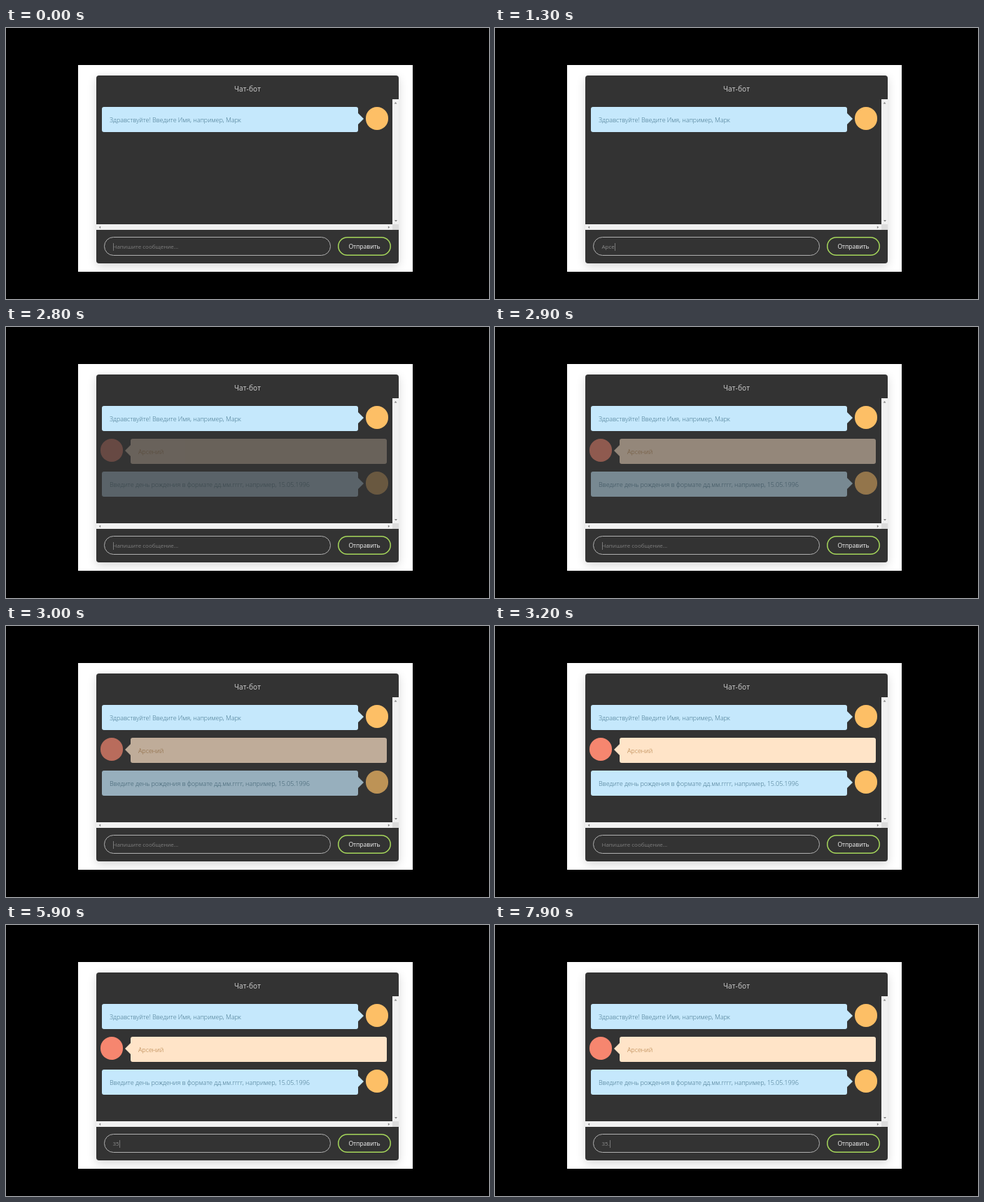
An HTML page for the animation above (8 s loop, 690 by 388 pixels).

```html
<!DOCTYPE html>
<html lang="ru">
<head>
<meta charset="utf-8">
<title>Чат-бот</title>
<style>
  html, body { margin: 0; width: 100%; height: 100%; overflow: hidden; background: #000; }
  body { font-family: "Open Sans", "Noto Sans", sans-serif; font-weight: 300; }
  .stage { position: absolute; left: 0; top: 0; width: 690px; height: 388px; overflow: hidden; background: #000; }
  .stage * { position: absolute; box-sizing: border-box; white-space: pre; }

  .page { left: 103px; top: 53px; width: 478px; height: 296px; background: #fff; overflow: hidden; }
  .panel { left: 26px; top: 15px; width: 432px; height: 269px; border-radius: 4px;
           background: #333; box-shadow: 0 4px 14px rgba(0, 0, 0, .16); }
  .title { left: 0; top: 0; width: 432px; line-height: 38px; text-align: center;
           font-size: 10.1px; font-weight: 400; letter-spacing: .15px; color: #d2d2d2; }

  .bar { background: #f1f1f1; }
  .bar.v { left: 423px; top: 34px; width: 9px; height: 179px; }
  .bar.h { left: 0; top: 213px; width: 423px; height: 8px; }
  .corner { left: 423px; top: 213px; width: 9px; height: 8px; background: #dcdcdc; }
  .arrow { width: 4px; height: 2.5px; background: #858585; clip-path: polygon(50% 0, 100% 100%, 0 100%); }

  .msg { left: 0; width: 423px; height: 36px; }
  .bubble { top: 0; width: 366px; height: 36px; padding-left: 11px; border-radius: 3px;
            line-height: 37.5px; font-size: 9.05px; letter-spacing: -.06px; }
  .bubble::after { content: ""; position: absolute; top: 8.5px; width: 8.5px; height: 17px; background: inherit; }
  .face { top: 0; width: 32.6px; height: 32.6px; border-radius: 50%; }
  .bot .bubble { left: 8px; background: #c5e8fc; color: #3f7088; }
  .bot .bubble::after { right: -8px; clip-path: polygon(0 0, 100% 50%, 0 100%); }
  .bot .face { left: 384.7px; background: #fdbf66; }
  .user .bubble { left: 49px; background: #ffe4c8; color: #b07a3e; }
  .user .bubble::after { left: -8px; clip-path: polygon(100% 0, 0 50%, 100% 100%); }
  .user .face { left: 5.7px; background: #f6866f; }

  .field, .send { top: 231px; height: 27px; border-radius: 14px; font-weight: 400; }
  .field { left: 11px; width: 324px; border: 1px solid #b0b0b0; padding-left: 11.5px;
           line-height: 26px; font-size: 8px; color: #8c8c8c; }
  .field * { position: static; }
  .hint { color: #7e7e7e; }
  .caret { display: inline-block; width: 1px; height: 11px; margin-right: -1px;
           vertical-align: -2.5px; background: #777; }
  .send { left: 345px; width: 76px; box-shadow: inset 0 0 0 1.5px #a6d75b; text-align: center;
          line-height: 28px; font-size: 8.7px; letter-spacing: -.1px; color: #f4f4f4; }
</style>
</head>
<body>
<div class="stage">
  <div class="page">
    <div class="panel">
      <div class="title">Чат-бот</div>
      <div class="bar v"></div>
      <div class="bar h"></div>
      <div class="corner"></div>
      <div class="arrow" style="left:425.5px;top:38px"></div>
      <div class="arrow" style="left:425.5px;top:207px;transform:rotate(180deg)"></div>
      <div class="arrow" style="left:3px;top:216px;transform:rotate(-90deg)"></div>
      <div class="arrow" style="left:416px;top:216px;transform:rotate(90deg)"></div>

      <div class="msg bot" style="top:45px"><div class="bubble">Здравствуйте! Введите Имя, например, Марк</div><div class="face"></div></div>
      <div class="msg user reply" style="top:92px"><div class="bubble">Арсений</div><div class="face"></div></div>
      <div class="msg bot reply" style="top:139px"><div class="bubble">Введите день рождения в формате дд.мм.гггг, например, 15.05.1996</div><div class="face"></div></div>

      <div class="field"><span class="typed"></span><span class="caret"></span><span class="hint">Напишите сообщение...</span></div>
      <div class="send">Отправить</div>
    </div>
  </div>
</div>
<script>
  const LOOP = 8000, FADE_FROM = 2675, FADE_TO = 3150;
  // [start ms, typed text, caret shown]
  const steps = [
    [0, "", 1], [300, "", 0], [500, "А", 1], [700, "Ар", 1], [900, "Арс", 1],
    [1100, "Арсе", 1], [1500, "Арсе", 0], [1900, "Арсен", 1], [2050, "Арсени", 1],
    [2200, "Арсений", 1], [2700, "", 1], [3200, "", 0], [3700, "", 1], [4300, "", 0],
    [4800, "", 1], [5300, "", 0], [5600, "3", 1], [5900, "35", 1], [6400, "35", 0],
    [6900, "35", 1], [7500, "35", 0], [7600, "35.", 1]
  ];
  const find = s => document.querySelector(s);
  const typed = find(".typed"), caret = find(".caret"), hint = find(".hint");
  const replies = document.querySelectorAll(".reply");
  const start = performance.now();

  function draw() {
    const t = (performance.now() - start) % LOOP;
    const [, text, on] = steps.filter(s => s[0] <= t).pop();
    if (typed.textContent !== text) typed.textContent = text;
    hint.style.display = text ? "none" : "";
    caret.style.opacity = on;
    const shown = Math.min(1, Math.max(0, (t - FADE_FROM) / (FADE_TO - FADE_FROM)));
    replies.forEach(r => r.style.opacity = shown);
    requestAnimationFrame(draw);
  }
  draw();
</script>
</body>
</html>
```
